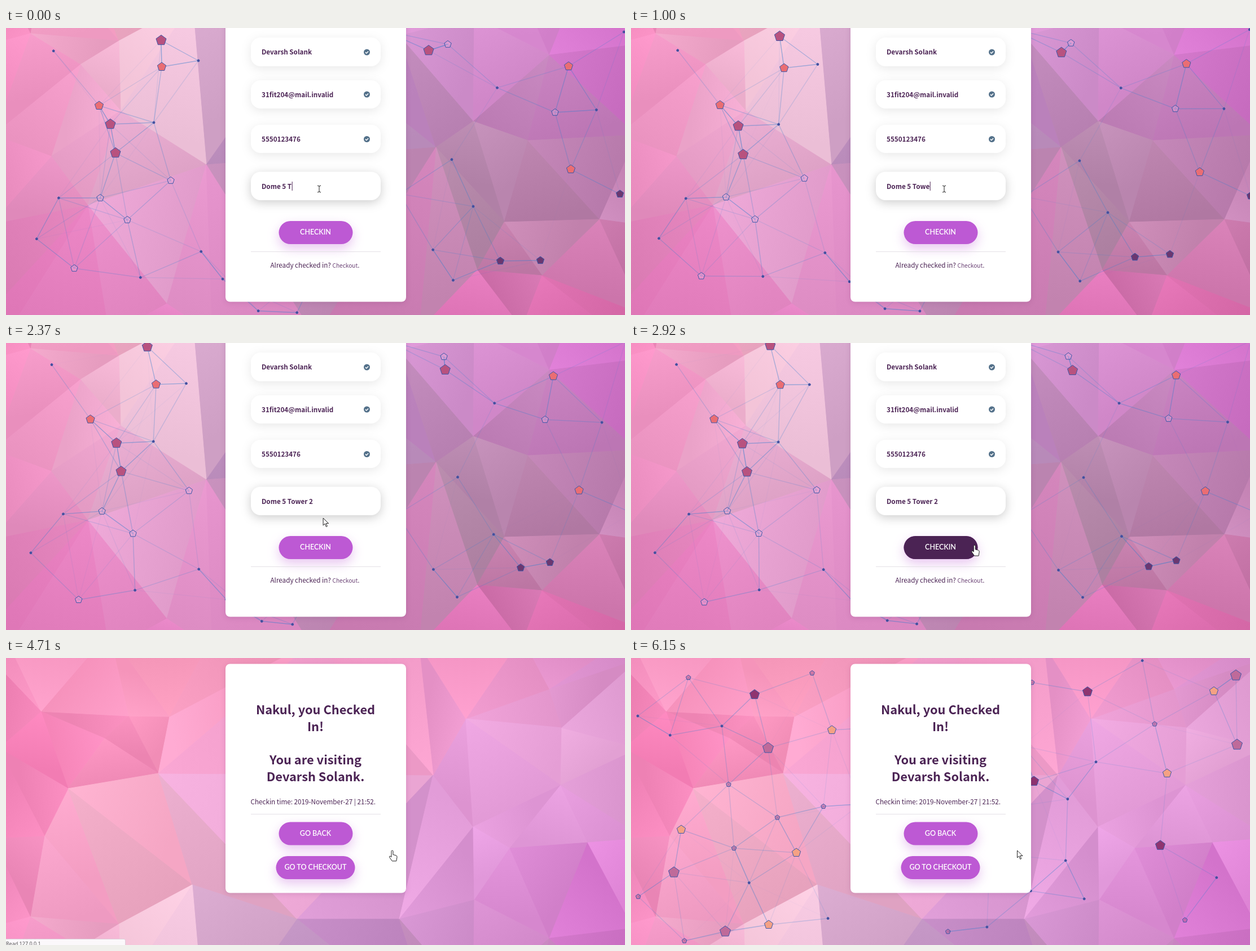
Animation, 1097 px wide and 510 px high, one loop 6200 ms. Source, as an HTML page with a canvas:

```html
<!DOCTYPE html>
<html lang="en">
<head>
<meta charset="utf-8">
<title>Visitor check-in</title>
<style>
html, body { margin: 0; width: 100%; height: 100%; overflow: hidden; }
canvas, svg { position: absolute; left: 0; top: 0; width: 1097px; height: 510px; }
text { font-family: "Noto Sans CJK SC", "Noto Sans CJK JP", "Noto Sans CJK", "Noto Sans", sans-serif; font-size: 11.68px; fill: #4b2354; white-space: pre; }
.value { font-weight: 700; }
.title { font-weight: 700; font-size: 21.8px; text-anchor: middle; }
.label { font: 600 12.5px Lato, sans-serif; fill: #fff; text-anchor: middle; }
.status text { font: 9px "Noto Sans", sans-serif; fill: #555; }
.card { fill: #fff; filter: drop-shadow(0 2px 5px rgba(80, 20, 80, .14)); }
.field rect { fill: #fff; filter: drop-shadow(0 4px 9px rgba(0, 0, 0, .09)); }
.field.focus rect { filter: drop-shadow(0 4px 9px rgba(0, 0, 0, .2)); }
.button { fill: #bd59d4; filter: drop-shadow(0 8px 10px rgba(189, 89, 212, .35)); }
.rule { stroke: #e4e1e6; }
.cursor path { fill: #fff; stroke: #222; stroke-width: 1; stroke-linejoin: round; }
</style>
</head>
<body>
<canvas id="scene" width="1097" height="510"></canvas>
<svg viewBox="0 0 1097 510">
  <defs>
    <g id="tick"><circle r="5.5"/><path d="M-2.6 .1l1.9 1.9 3.3-3.6" fill="none" stroke="#fff" stroke-width="1.5"/></g>
  </defs>

  <g id="form">
    <rect class="card" x="389" y="-20" width="320" height="506.5" rx="8"/>
    <g class="field"><rect x="434" y="17" width="230" height="51" rx="17"/><text class="value" x="453" y="47">Devarsh Solank</text></g>
    <g class="field"><rect x="434" y="93" width="230" height="50" rx="17"/><text class="value" x="453" y="122.5">31fit204@mail.invalid</text></g>
    <g class="field"><rect x="434" y="172" width="230" height="50" rx="17"/><text class="value" x="453" y="202">5550123476</text></g>
    <g class="field" id="room"><rect x="434" y="255.5" width="230" height="50.5" rx="17"/><text class="value" id="typed" x="453" y="285.5"></text></g>
    <rect id="caret" y="273" width="1" height="16" fill="#4b2354"/>
    <g fill="#54718a">
      <use href="#tick" x="639.5" y="43"/><use href="#tick" x="639.5" y="118"/><use href="#tick" x="639.5" y="197.5"/>
    </g>
    <use id="roomTick" href="#tick" x="639.5" y="281" fill="#57b846"/>
    <rect class="button" x="483.5" y="343" width="131" height="41" rx="20.5"/>
    <rect id="hover" x="483.5" y="343" width="131" height="41" rx="20.5" fill="#4b2354"/>
    <text class="label" x="548.5" y="367">CHECKIN</text>
    <path class="rule" d="M434 397.5h230"/>
    <text x="468.5" y="426">Already checked in? <tspan font-size="10.1" fill="#6a4174">Checkout</tspan>.</text>
  </g>

  <g id="done">
    <rect class="card" x="389" y="10.5" width="320" height="407" rx="8"/>
    <text class="title" x="548.5" y="99.5">Nakul, you Checked</text>
    <text class="title" x="548.5" y="129.5">In!</text>
    <text class="title" x="548.5" y="189">You are visiting</text>
    <text class="title" x="548.5" y="218.5">Devarsh Solank.</text>
    <text x="433.5" y="259.5">Checkin time: 2019-November-27 | 21:52.</text>
    <path class="rule" d="M434 277.5h230"/>
    <rect class="button" x="483.5" y="291.5" width="131" height="41" rx="20.5"/>
    <text class="label" x="548.5" y="315.5">GO BACK</text>
    <rect class="button" x="478.5" y="352" width="140" height="41" rx="20.5"/>
    <text class="label" x="548.5" y="376">GO TO CHECKOUT</text>
  </g>

  <g class="status" id="status">
    <path d="M-1 499.5h210q2.500 0 2.500 2.500v10h-212z" fill="#fbf8fb" stroke="#ddd0da"/>
    <text id="statusText" x="0" y="511"></text>
  </g>

  <g class="cursor" id="cursor">
    <path id="ibeam" style="fill:none" d="M-3-6q3 0 3 2q0-2 3-2M0-4v8M-3 6q3 0 3-2q0 2 3 2"/>
    <path id="arrow" d="M0 0v13l3-3 2.300 5.500 2-1-2.300-5h4.500z"/>
    <path id="hand" d="M-1.500 1.500a1.500 1.500 0 0 1 3 0v6l5.200 1.300q2 .6 1.800 3l-1.200 7h-7.500l-4.600-6.600q-.8-2.200 1.200-2.200l2.100 1.600z"/>
  </g>
</svg>

<script>
const LOOP = 6200, SUBMIT = 4710, NETWORK_READY = 4790, BLUR = 3300;
const W = 1097, H = 510, SHEET = 960, SCROLL = 450;
const ROOM = 'Dome 5 Tower 2';
const $ = id => document.getElementById(id);
const ctx = $('scene').getContext('2d');

function seeded(seed) {
  return () => {
    seed = (seed + 0x6d2b79f5) | 0;
    let n = Math.imul(seed ^ (seed >>> 15), seed | 1);
    n ^= n + Math.imul(n ^ (n >>> 7), n | 61);
    return ((n ^ (n >>> 14)) >>> 0) / 2 ** 32;
  };
}

const mix = (a, b, k) => a + (b - a) * k;
const ramp = (t, from, to) => Math.min(1, Math.max(0, (t - from) / (to - from)));

// Backdrop tints on an even grid, top to bottom.
const TINTS = [
  'f493c0 fa9cbe f8a0c4 f796c4 d890d0',
  'f77cb6 fa96c0 f0a0d0 ea9fdc dea0ce',
  'f48abd f4b2c8 e8a6d6 e49cdc e295da',
  'f08abd f7cfde b880c0 d58fcf dc6ad2',
  'ee8cbf eebfda c89cc8 b482aa c888c2',
  'dd82b6 e09cca c890bc b084a4 c684b0',
  'e472b8 e886c6 e080c4 e274b8 d868a8'
].map(row => row.split(' ').map(hex => [0, 2, 4].map(i => parseInt(hex.slice(i, i + 2), 16))));

function tintAt(x, y) {
  const u = ramp(x, 0, W) * 3.999, v = ramp(y, 0, SHEET) * 5.999;
  const i = Math.floor(u), j = Math.floor(v);
  return [0, 1, 2].map(c => mix(
    mix(TINTS[j][i][c], TINTS[j][i + 1][c], u - i),
    mix(TINTS[j + 1][i][c], TINTS[j + 1][i + 1][c], u - i), v - j));
}

// The main corners of the low-poly backdrop; the border is filled in evenly.
const corners = [
  [217, 103], [290, 104], [175, 143], [62, 95], [110, 232], [270, 205], [68, 316], [330, 403],
  [43, 460], [200, 473], [516, 464], [697, 464], [815, 108], [963, 55], [985, 124], [757, 208],
  [828, 300], [983, 226], [893, 338], [830, 430], [963, 498], [1031, 328],
  [203, 597], [132, 515], [80, 678], [145, 765], [355, 693], [828, 616], [925, 650],
  [762, 662], [883, 795], [1052, 790], [950, 890], [835, 880], [285, 940]
];

function borderPoints(random) {
  const points = [];
  for (let i = 0; i <= 6; i++) {
    points.push([i * W / 6, -20 - 30 * random()], [i * W / 6, SHEET + 20 + 30 * random()],
      [-10 - 30 * random(), i * SHEET / 6], [W + 10 + 30 * random(), i * SHEET / 6]);
  }
  return points;
}

function circumcircle([ax, ay], [bx, by], [cx, cy]) {
  const p = bx - ax, q = by - ay, r = cx - ax, s = cy - ay;
  const det = 2 * (p * s - q * r);
  const x = (s * (p * p + q * q) - q * (r * r + s * s)) / det;
  const y = (p * (r * r + s * s) - r * (p * p + q * q)) / det;
  return { x: ax + x, y: ay + y, r: Math.hypot(x, y), flat: Math.abs(det) < 1 };
}

// Delaunay: keep each triangle whose circumcircle holds no other point.
function triangulate(points) {
  const triangles = [];
  points.forEach((a, i) => points.slice(i + 1).forEach((b, j) => {
    for (const c of points.slice(i + j + 2)) {
      const circle = circumcircle(a, b, c);
      const inside = ([x, y]) => Math.hypot(x - circle.x, y - circle.y) < circle.r - 1e-6;
      if (!circle.flat && !points.some(inside)) triangles.push([a, b, c]);
    }
  }));
  return triangles;
}

function renderSheet() {
  const canvas = Object.assign(document.createElement('canvas'), { width: W, height: SHEET });
  const c = canvas.getContext('2d');
  const random = seeded(11);
  for (const [p, q, r] of triangulate([...corners, ...borderPoints(random)])) {
    const light = 16 * (random() - .5);
    const tint = tintAt((p[0] + q[0] + r[0]) / 3, (p[1] + q[1] + r[1]) / 3);
    const shade = extra => `rgb(${tint.map(v => Math.min(255, Math.round(v + light + extra)))})`;
    const fill = c.createLinearGradient(...p, (q[0] + r[0]) / 2, (q[1] + r[1]) / 2);
    fill.addColorStop(0, shade(8));
    fill.addColorStop(1, shade(-6));
    c.beginPath();
    [p, q, r].forEach(point => c.lineTo(...point));
    c.closePath();
    c.fillStyle = c.strokeStyle = fill;
    c.fill();
    c.stroke();
  }
  return canvas;
}

const BERRY = { fill: '#b8527f', r: 9.5 }, SALMON = { fill: '#ea6d73', r: 8 },
      PLUM = { fill: '#6b3770', r: 7 }, HOLLOW = { fill: 'rgba(240,175,220,.35)', r: 6.5 },
      DOT = { fill: '#4a4a98', r: 2.2 }, PEACH = { fill: '#f5a184', r: 8 },
      WINE = { fill: '#8f3470', r: 9 }, ROSE = { fill: '#bf6a9a', r: 10 },
      GREY = { fill: 'rgba(170,80,135,.45)', r: 4.5 };

// Each node: x, y and how far it drifts before the page is left.
const formNodes = [
  [BERRY, [275, 22, -32, -20], [185, 171, 14, 9], [194, 222, 13, 8], [749, 40, 38, 10]],
  [SALMON, [276, 69, -13, 6], [165, 138, -20, -3], [997, 68, -35, -12], [1001, 251, 19, 14]],
  [PLUM, [876, 414, 47, -19], [947, 413, 22, -30], [1088, 295, 28, 9]],
  [HOLLOW, [292, 271, 42, -11], [167, 302, 4, -4], [215, 341, 13, -3], [121, 427, 10, 38],
    [973, 150, -23, -18], [783, 29, -9, -6]],
  [DOT, [341, 58, -28, 18], [262, 168, -1, 9], [828, 317, 47, 30]]
].flatMap(([style, ...rows]) => rows.map(([x, y, dx, dy]) => ({ ...style, x, y, dx, dy })));

// Final places of the larger nodes on the second page.
const doneNodes = [
  [PEACH, [89, 305], [356, 128], [293, 346], [244, 474], [1033, 59], [950, 205]],
  [WINE, [219, 65], [809, 60], [714, 219], [938, 333]],
  [ROSE, [243, 160], [76, 381], [167, 486], [1072, 31], [1074, 154]]
].flatMap(([style, ...rows]) => rows.map(([x, y]) => ({ ...style, x, y })));

// Fills a page up with small nodes that keep clear of the ones already there.
function scatter(nodes, count, seed, styles) {
  const random = seeded(seed);
  while (count > 0) {
    const x = random() * W, y = random() * H;
    if (nodes.some(n => Math.hypot(n.x - x, n.y - y) < 62)) continue;
    nodes.push({ ...styles[count % styles.length], x, y });
    count--;
  }
  for (const n of nodes) {
    n.dx ??= 30 * (random() - .5);
    n.dy ??= 30 * (random() - .5);
  }
}
scatter(formNodes, 18, 5, [DOT]);
scatter(doneNodes, 34, 23, [GREY, DOT]);

function drawNetwork(nodes, k, reach) {
  const placed = nodes.map(n => ({ ...n, x: n.x + n.dx * k, y: n.y + n.dy * k }));
  ctx.lineWidth = 1.4;
  placed.forEach((a, i) => {
    for (const b of placed.slice(i + 1)) {
      const d = Math.hypot(a.x - b.x, a.y - b.y);
      if (d >= reach) continue;
      ctx.strokeStyle = `rgba(50,125,205,${0.7 * (1 - d / reach)})`;
      ctx.beginPath();
      ctx.moveTo(a.x, a.y);
      ctx.lineTo(b.x, b.y);
      ctx.stroke();
    }
  });
  ctx.lineWidth = 1;
  ctx.strokeStyle = '#3a57a8';
  for (const { x, y, r, fill } of placed) {
    ctx.beginPath();
    for (let i = 0; i < 5; i++) {
      const angle = i * Math.PI * 0.4 - Math.PI / 2;
      ctx.lineTo(x + r * Math.cos(angle), y + r * Math.sin(angle));
    }
    ctx.closePath();
    ctx.fillStyle = fill;
    ctx.fill();
    ctx.stroke();
  }
}

const pointerPath = [
  { t: 2290, x: 555, y: 286 }, { t: 2370, x: 562, y: 311 }, { t: 2750, x: 602, y: 358 },
  { t: 3130, x: 617, y: 361 }, { t: 4240, x: 617, y: 361 }, { t: 4540, x: 684.5, y: 342 }
];

function pointerAt(t) {
  return pointerPath.reduce((at, to, i) => {
    const k = i ? ramp(t, pointerPath[i - 1].t, to.t) : 1;
    return { x: mix(at.x, to.x, k), y: mix(at.y, to.y, k) };
  }, pointerPath[0]);
}

const sheet = renderSheet();
const show = (id, on) => $(id).style.display = on ? '' : 'none';

function render(t) {
  const submitted = t >= SUBMIT;
  ctx.drawImage(sheet, 0, submitted ? 0 : -SCROLL);
  if (!submitted) drawNetwork(formNodes, Math.sin(ramp(t, 0, 4240) * Math.PI / 2), 175);
  else if (t >= NETWORK_READY) drawNetwork(doneNodes, (t - 6150) / 1400, 160);

  show('form', !submitted);
  show('done', submitted);

  $('typed').textContent = ROOM.slice(0, 8 + Math.floor(t / 265));
  $('room').classList.toggle('focus', t < BLUR);
  show('roomTick', t >= BLUR);
  show('caret', t < 1450);
  if (t < 1450) $('caret').setAttribute('x', 453.5 + $('typed').getComputedTextLength());
  $('hover').setAttribute('opacity', ramp(t, 2560, 2830) - ramp(t, 4310, 4540));

  show('status', t >= 3530 && t < 4870);
  $('statusText').textContent = t < 4400 ? 'Waiting for 127.0.0.1' : 'Read 127.0.0.1';

  const { x, y } = pointerAt(t);
  const shape = t < 2300 ? 'ibeam' : t < 2600 || t >= NETWORK_READY ? 'arrow' : 'hand';
  $('cursor').setAttribute('transform', `translate(${x} ${y})`);
  ['ibeam', 'arrow', 'hand'].forEach(id => show(id, id === shape));
}

const start = performance.now();
function frame() {
  render((performance.now() - start) % LOOP);
  requestAnimationFrame(frame);
}
frame();
</script>
</body>
</html>
```
